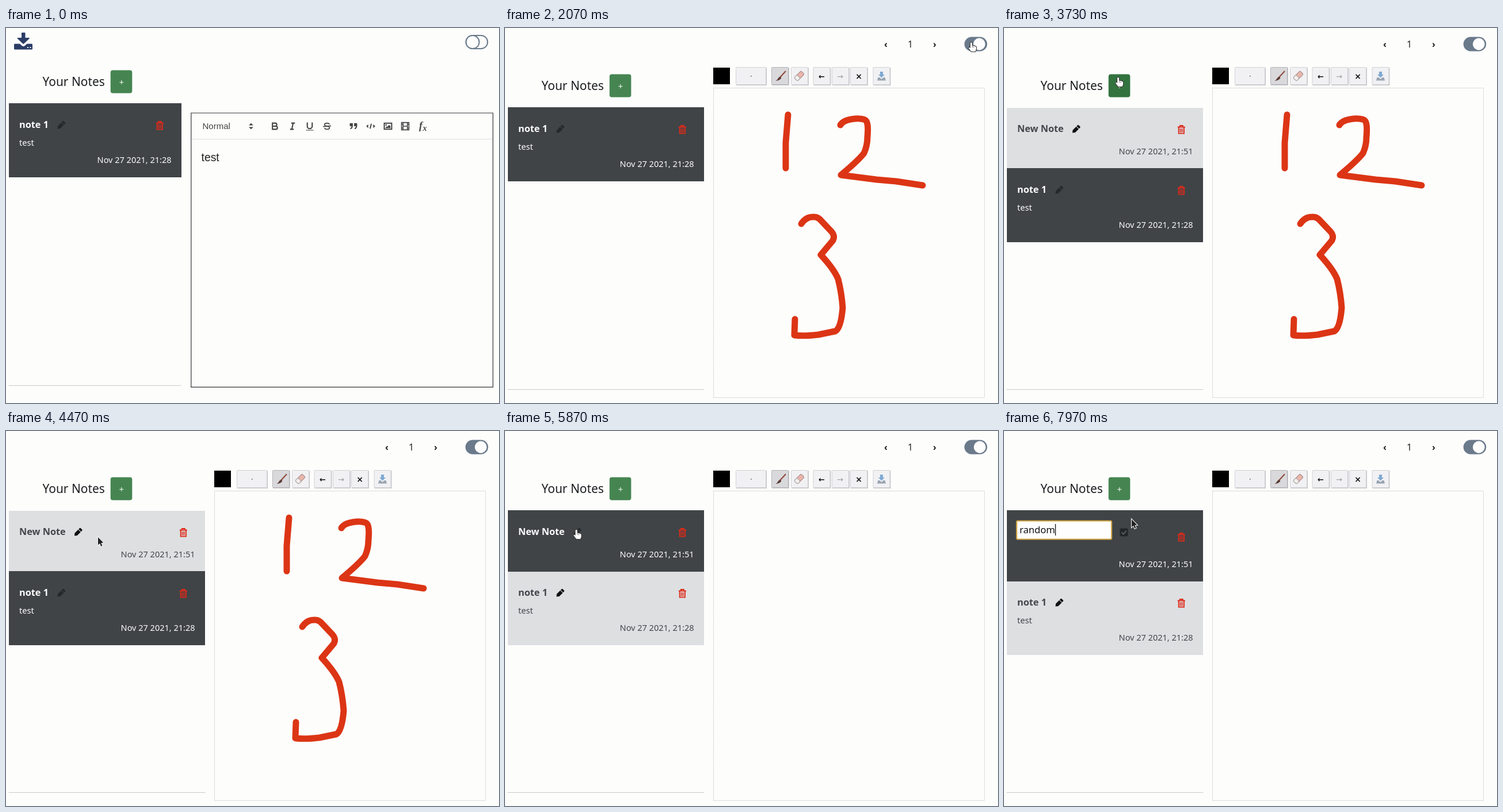
An HTML page with a canvas that plays this animation: 857x653 px, repeating every 8000 ms.

```html
<!DOCTYPE html>
<html lang="en">
<head>
<meta charset="utf-8">
<title>Notes demo</title>
<style>
  html, body { margin: 0; width: 100%; height: 100%; overflow: hidden; background: #fdfdfc; }
  canvas { display: block; }
</style>
</head>
<body>
<canvas id="stage" width="857" height="653"></canvas>
<script>
const ctx = document.getElementById('stage').getContext('2d');
const LOOP = 8000;
const UI = '"Noto Sans", "Open Sans", sans-serif';
const ARIAL = '"Liberation Sans", Arial, sans-serif';
const C = {
  page: '#fdfdfc', dark: '#404447', light: '#dddfe1', red: '#dd2a1a',
  green: '#468551', greenHover: '#33733f', slate: '#6a7a8b', navy: '#2b3d66',
  icon: '#444', marker: '#dc3515'
};

// Moments (ms) at which the interface changes state
const AT = { draw: 1930, sketch: 1990, add: 3670, select: 4600, edit: 6000, mark: 6450, type: 7050 };
const KEY_GAP = 110;
const NEW_TITLE = 'random';

// Pointer path: time, x, y
const POINTER = [
  [200, 560, -18], [780, 600, 296], [1170, 600, 296], [1370, 739, 62], [1650, 810.5, 25],
  [2880, 810.5, 25], [3500, 198.5, 86], [3950, 198.5, 86], [4450, 160, 185], [4720, 160, 185],
  [5170, 265, 68], [5420, 265, 68], [5850, 124, 172], [6150, 124, 172], [6450, 118, 161],
  [7700, 118, 161], [7970, 222, 154]
];

const SKETCH = [
  'M492 151 L488 200 L488 244',
  'M583 169 Q588 160 608 158 Q625 157 628 162 Q632 168 630 190 Q630 205 624 218 Q615 230 584 256 L646 264 L680 267 L726 274',
  'M515 341 Q523 329 535 329 Q544 328 550 336 L568 355 Q574 362 570 370 L549 395 Q572 420 579 437 Q585 460 587 487 Q584 523 574 528 L545 534 Q520 537 503 535 L504 507'
].map(d => new Path2D(d));

// Editor icons on an 18 unit grid: centre x, stroked path, filled path, line width
const ICONS = [
  [426, 'M7 11L9 13L11 11Z M7 7L9 5L11 7Z', 'M7 11L9 13L11 11Z M7 7L9 5L11 7Z', 1.4],
  [467.5, 'M5 4H9.5A2.5 2.5 0 0 1 9.5 9H5Z M5 9H10.5A2.5 2.5 0 0 1 10.5 14H5Z', '', 2],
  [498, 'M7 4H13 M5 14H11 M8 14L10 4', '', 2],
  [528, 'M5 3V9A4 4 0 0 0 13 9V3', 'M3 15H15V16H3Z', 2],
  [558, 'M13 6C12.4 4.4 11 4 9 4C6.5 4 5 5.2 5 6.5C5 8.4 7 8.8 9 9C11 9.2 13 9.6 13 11.5C13 13 11.5 14 9 14C7 14 5.5 13.5 5 12 M15.5 8.5L2.5 9.5', '', 1.6],
  [604, 'M4 5H7V8H4Z M11 5H14V8H11Z M7 8C7 12 4 13 4 13 M14 8C14 12 11 13 11 13', 'M4 5H7V8H4Z M11 5H14V8H11Z', 2],
  [634, 'M5 7L3 9L5 11 M13 7L15 9L13 11 M10 5L8 13', '', 1.8],
  [664, 'M3 4H15V14H3Z', 'M5 12V11L7 9L8 10L11 7L13 9V12Z M5 6H7V8H5Z', 1.9],
  [694, 'M3 3H15V15H3Z M5.5 3V15 M12.5 3V15 M5 9H13 M3 6H6 M3 12H6 M12 6H15 M12 12H15', '', 1.5]
].map(([x, stroke, fill, width]) => ({ x, stroke: new Path2D(stroke), fill: new Path2D(fill), width }));

const ARROW = new Path2D('M0 0L0 13.5L3 10.8L5.2 15.8L7.4 14.8L5.3 10L9.3 9.6Z');
const HAND = new Path2D('M-1.5 1Q0 -1 1.5 1V6Q3 5 4 6.5Q5.5 5.5 6.5 7Q8.5 6.5 8.5 9V12Q8 14 7 16H0L-4.5 10Q-4.5 7.5 -1.5 10Z');

function rect(x, y, w, h, fill) {
  ctx.fillStyle = fill;
  ctx.fillRect(x, y, w, h);
}

function round(x, y, w, h, r, fill, stroke, width = 1) {
  ctx.beginPath();
  ctx.roundRect(x, y, w, h, r);
  if (fill) { ctx.fillStyle = fill; ctx.fill(); }
  if (stroke) { ctx.strokeStyle = stroke; ctx.lineWidth = width; ctx.stroke(); }
}

function text(str, x, y, size, color, { family = UI, style = '', align = 'left' } = {}) {
  ctx.font = `${style} ${size}px ${family}`;
  ctx.textAlign = align;
  ctx.fillStyle = color;
  ctx.fillText(str, x, y);
}

function path(d, color, width) {
  const shape = typeof d === 'string' ? new Path2D(d) : d;
  if (width) {
    ctx.strokeStyle = color;
    ctx.lineWidth = width;
    ctx.stroke(shape);
  } else {
    ctx.fillStyle = color;
    ctx.fill(shape);
  }
}

function at(x, y, draw, scale = 1, angle = 0) {
  ctx.save();
  ctx.translate(x, y);
  ctx.rotate(angle);
  ctx.scale(scale, scale);
  draw();
  ctx.restore();
}

function dotted(x1, y1, x2, y2, color = '#bbb') {
  ctx.save();
  ctx.setLineDash([1, 1]);
  path(`M${x1} ${y1}L${x2} ${y2}`, color, 1);
  ctx.restore();
}

function pencil(x, y, color) {
  at(x, y, () => {
    path('M-9 0L-5 -3.2H4V3.2H-5Z M5 -3.2H7.5Q9 -3.2 9 -1.7V1.7Q9 3.2 7.5 3.2H5Z', color);
  }, 0.95, -Math.PI / 4);
}

function trash(x, y) {
  at(x, y, () => {
    path('M-6.5 -4.5H6.5 M-2.5 -5V-7H2.5V-5 M-4.6 -4V6.6H4.6V-4', C.red, 1.9);
    path('M-2 -2V4.8 M0 -2V4.8 M2 -2V4.8', C.red, 1.2);
  });
}

function titleInput(y, t) {
  const typed = Math.max(0, Math.floor((t - AT.type) / KEY_GAP) + 1);
  const value = typed ? NEW_TITLE.slice(0, typed) : 'New Note';
  const marked = t >= AT.mark && !typed;
  round(22, y + 17.5, 165, 32, 2, '#fefefe', '#d2a544', 2.2);
  ctx.font = `16.6px ${UI}`;
  const width = ctx.measureText(value).width;
  if (marked) rect(26, y + 20, width + 1.5, 26, '#5d83e8');
  text(value, 27, y + 39, 16.6, marked ? '#eef2ff' : '#111');
  if (!marked) rect(27 + width, y + 23, 1.3, 20, '#111');
  round(201.5, y + 30.5, 14, 14, 2.5, '#222629');
  path(`M204.5 ${y + 37.5}l3 3l5.5 -6`, '#565b5f', 2);
}

function card(y, right, note, active, t, editing = false) {
  const body = note.body ? 22 : 0;
  const shift = editing ? 17 : 0;
  const height = 106 + body + shift;
  const overlap = active ? 1 : 0;
  const color = active ? '#fcfcfc' : '#42464a';
  rect(5, y - overlap, right - 5, height + overlap, active ? C.dark : C.light);
  if (editing) {
    titleInput(y, t);
  } else {
    text(note.title, 23, y + 42, 16.3, color, { style: 'bold' });
    pencil(note.pencil, y + 37.5, active ? '#25292b' : '#111');
  }
  trash(right - 37.7, y + 38 + (editing ? 8 : 0));
  if (note.body) text(note.body, 23, y + 73, 14.6, color);
  text(note.date, right - 17.5, y + 81 + body + shift, 14.5, color, { align: 'right' });
  return y + height;
}

const FIRST = { title: 'note 1', body: 'test', date: 'Nov 27 2021, 21:28', pencil: 95.5 };
const SECOND = { title: 'New Note', body: '', date: 'Nov 27 2021, 21:51', pencil: 125 };

function sidebar(t, drawing, pointer) {
  const dy = drawing ? 7 : 0;
  const right = drawing ? 346 : 305;
  text('Your Notes', 63.5, 101 + dy, 20.9, '#1c1e20');
  const hover = pointer && inside(pointer, 182, 74 + dy, 37, 40);
  round(181.7, 73.5 + dy, 37.6, 40, 4, hover ? C.greenHover : C.green);
  text('+', 200.7, 99.5 + dy, 15, '#f4f8f4', { align: 'center' });

  let y = 132 + dy;
  if (t >= AT.add) y = card(y, right, SECOND, t >= AT.select, t, t >= AT.edit);
  card(y, right, FIRST, t < AT.select, t);
  dotted(5, 622.5 + dy, right, 622.5 + dy, '#999');
}

function toggle(t, drawing) {
  const y = drawing ? 28 : 24.5;
  const on = Math.min(1, Math.max(0, (t - AT.draw) / 150));
  round(799.6, y - 11.5, 37.6, 23, 11.5, drawing ? C.slate : C.page, C.slate, 2);
  ctx.beginPath();
  ctx.arc(811.1 + 14.2 * on, y, drawing ? 10.4 : 11.5, 0, 7);
  ctx.fillStyle = '#fdfdfd';
  ctx.fill();
  if (!drawing) { ctx.strokeStyle = C.slate; ctx.lineWidth = 2; ctx.stroke(); }
}

function editor() {
  path('M27 8.5Q27 8 28 8H32.5Q33.5 8 33.5 9V17H40Q41.5 17.3 40.5 18.5L31 27.5Q30.2 28 29.4 27.5L20 18.5Q19 17.3 20.5 17H27Z', C.navy);
  path('M15.5 27.5H24L27.5 30.8Q30.2 33 33 30.8L36.5 27.5H44.5Q46 27.5 46 29V36Q46 37.5 44.5 37.5H15.5Q14 37.5 14 36V29Q14 27.5 15.5 27.5Z', C.navy);
  rect(37, 33, 2, 2, C.page);
  rect(41.5, 33, 2, 2, C.page);

  round(321.8, 148, 524.7, 477.3, 0, null, '#34343a', 1.2);
  dotted(322, 193.5, 846, 193.5);
  text('Normal', 341.5, 175.5, 15, C.icon, { family: ARIAL });
  for (const icon of ICONS) {
    at(icon.x, 171, () => {
      ctx.translate(-9, -9);
      path(icon.stroke, C.icon, icon.width);
      path(icon.fill, C.icon);
    }, 1.07);
  }
  const serif = { family: '"Liberation Serif", serif', style: 'italic bold' };
  text('f', 718, 176, 18, C.icon, serif);
  text('x', 724.5, 179, 14, C.icon, serif);
  text('test', 339.5, 232, 19.4, '#222', { family: ARIAL });
}

function toolButton(x, width, pressed) {
  rect(x + 1, 69, width, 31, '#c6c6ca');
  round(x + 0.5, 68.5, width - 1, 30, 1, pressed ? '#d9d9dc' : '#f1f1f4', pressed ? '#b4b4b8' : '#d2d2d6');
}

function board(t) {
  const center = { align: 'center' };
  text('‹', 662, 34, 16, '#222', { align: 'center', style: 'bold' });
  text('1', 704.5, 33.5, 16, '#222', center);
  text('›', 747, 34, 16, '#222', { align: 'center', style: 'bold' });

  rect(362, 69, 29, 29, '#000');
  toolButton(401, 53);
  rect(427, 83, 1.5, 1.5, '#444');
  toolButton(463, 30, true);
  for (const x of [497, 535.5, 568, 600, 639.5]) toolButton(x, 30);

  path('M488 75L478 86', '#8d4a3a', 2);
  path('M478 84.5L480.5 87Q478 91.5 470.5 92Q474 90 475 87Z', '#5c3a35');
  at(511.5, 83.5, () => {
    round(-8.5, -4.2, 17, 8.4, 2.5, '#e9b5ab', '#a58d88');
    round(-8.5, -4.2, 7, 8.4, 2.5, '#f3efee', '#a9a3a2');
  }, 1, -Math.PI / 4);
  const mono = { family: '"DejaVu Sans", sans-serif', align: 'center' };
  text('←', 550.5, 89, 13, '#111', { ...mono, style: 'bold' });
  text('→', 582.5, 89, 13, '#999', mono);
  text('×', 615, 88.5, 14, '#111', { ...mono, style: 'bold' });
  path('M652 76H657V81H660L654.5 86.5L649 81H652Z', '#7fa9d2');
  path('M648.5 86H651L654.5 89L658 86H660.5L662 91.5H647Z', '#98a5b0');

  dotted(362.5, 104.5, 833.5, 104.5);
  dotted(362.5, 643.5, 833.5, 643.5);
  dotted(362.5, 104, 362.5, 644);
  path('M833.5 104V644', '#dedede', 1);
  if (t >= AT.sketch && t < AT.select) {
    ctx.save();
    ctx.lineCap = ctx.lineJoin = 'round';
    for (const stroke of SKETCH) path(stroke, C.marker, 11);
    ctx.restore();
  }
}

function inside(p, x, y, w, h) {
  return p.x >= x && p.x <= x + w && p.y >= y && p.y <= y + h;
}

function pointerAt(t) {
  const next = POINTER.findIndex(k => k[0] > t);
  if (next === 0) return null;
  if (next < 0) {
    const [, x, y] = POINTER[POINTER.length - 1];
    return { x, y };
  }
  const [t0, x0, y0] = POINTER[next - 1];
  const [t1, x1, y1] = POINTER[next];
  const u = (t - t0) / (t1 - t0);
  const e = u * u * (3 - 2 * u);
  return { x: x0 + (x1 - x0) * e, y: y0 + (y1 - y0) * e };
}

function pointerKind(p, t, drawing) {
  const dy = drawing ? 7 : 0;
  if (inside(p, 799, 12, 39, 28) || inside(p, 182, 74 + dy, 37, 40)) return 'hand';
  if (t >= AT.edit && inside(p, 22, 156, 165, 33)) return 'beam';
  if (t >= AT.select && t < AT.edit && inside(p, 116, 168, 17, 17)) return 'hand';
  if (!drawing && inside(p, 322, 194, 524, 431)) return 'beam';
  return 'arrow';
}

function drawPointer(p, kind) {
  at(p.x, p.y, () => {
    if (kind === 'beam') {
      path('M-2.5 -6H2.5 M0 -6V6 M-2.5 6H2.5', '#333', 1.2);
    } else if (kind === 'hand') {
      path(HAND, '#333', 2);
      path(HAND, '#fff');
      path('M2 9V6 M4.5 9.5V7', '#555', 0.8);
    } else {
      path(ARROW, '#f4f4f4', 2.2);
      path(ARROW, '#222');
    }
  });
}

function render(t) {
  const drawing = t >= AT.draw;
  const pointer = pointerAt(t);
  rect(0, 0, 857, 653, C.page);
  if (drawing) board(t); else editor();
  sidebar(t, drawing, pointer);
  toggle(t, drawing);
  if (pointer) drawPointer(pointer, pointerKind(pointer, t, drawing));
}

const start = performance.now();
function tick() {
  render((performance.now() - start) % LOOP);
  requestAnimationFrame(tick);
}
tick();
</script>
</body>
</html>
```
